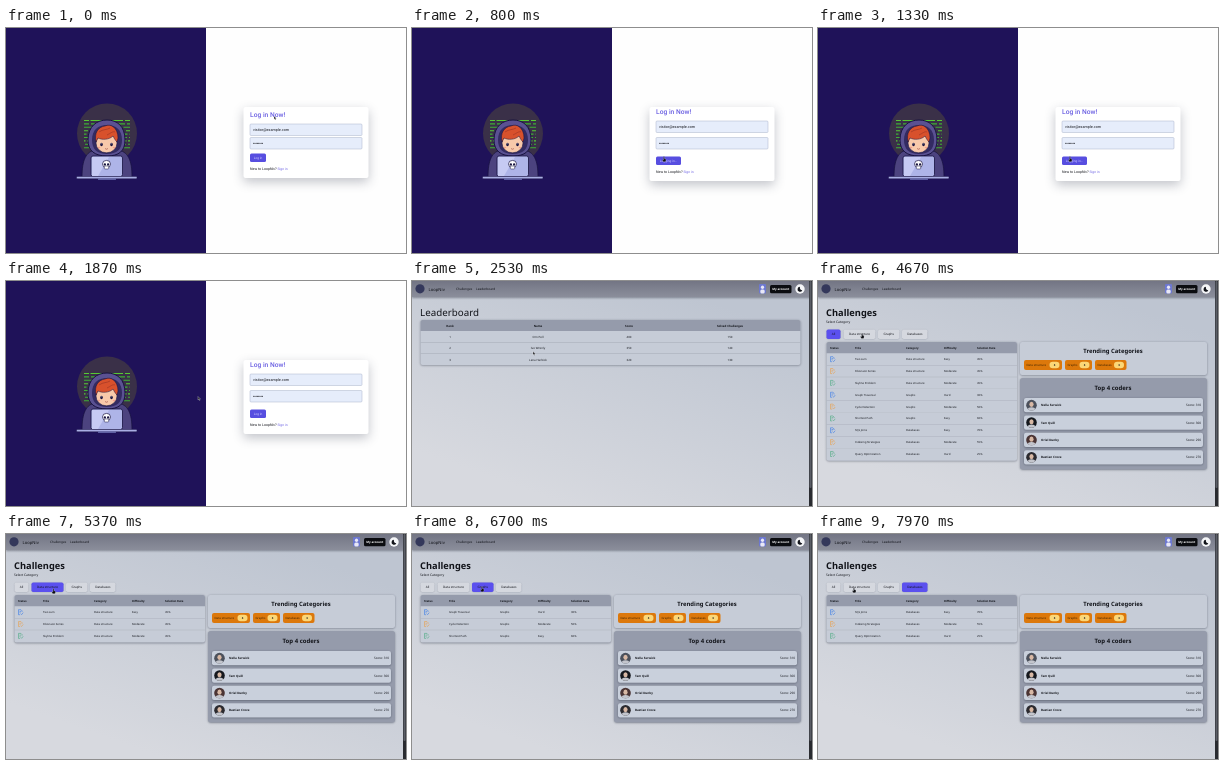
These frames come from a looping animation (400x225 px, 8000 ms). An HTML page with a canvas:

```html
<!DOCTYPE html>
<html lang="en">
<head>
<meta charset="utf-8">
<title>Coding challenges</title>
<style>
html, body { margin: 0; width: 100%; height: 100%; overflow: hidden; }
canvas { display: block; width: 100vw; height: 100vh; }
</style>
</head>
<body>
<canvas id="stage"></canvas>
<script>
const W = 400, H = 225, LOOP = 8000;
const canvas = document.getElementById('stage');
const ctx = canvas.getContext('2d');
const INK = '#12141a', PURPLE = '#5b50ee', NAVY = '#1f1259', STEEL = '#959bab', PANEL = '#c6ccd7';

// Times at which the interface changes
const AT = { submit: 620, answered: 1480, leaderboard: 2080, hover: 3350, challenges: 3600,
  avatars: 4080, unhover: 4350, structures: 5150, graphs: 6000, databases: 7080 };

// Pointer stops: time, x, y
const PATH = [[0, 268, 88], [560, 252, 130], [1450, 252, 130], [1870, 192, 115.5], [2530, 121, 70.5],
  [3300, 49, 8.5], [3950, 49, 8.5], [4750, 44, 55], [5370, 47.5, 56], [5500, 47.5, 56], [5900, 70, 54],
  [6700, 70, 54], [7030, 97, 53], [7530, 97, 53], [7950, 36, 55], [LOOP, 36, 55]];

const CATEGORIES = ['All', 'Data structure', 'Graphs', 'Databases'];
const CHALLENGES = [
  ['Two sum', 1, 'Easy', '45%'], ['Fibonacci Series', 1, 'Moderate', '45%'], ['Skyline Problem', 1, 'Moderate', '45%'],
  ['Graph Traversal', 2, 'Hard', '30%'], ['Cycle Detection', 2, 'Moderate', '50%'], ['Shortest Path', 2, 'Easy', '60%'],
  ['SQL Joins', 3, 'Easy', '70%'], ['Indexing Strategies', 3, 'Moderate', '55%'], ['Query Optimization', 3, 'Hard', '25%']];
const CODERS = [['Nella Farwick', 310, '#4b505b'], ['Tam Quill', 300, '#15181e'],
  ['Oriel Dunby', 290, '#4a3434'], ['Bastian Crove', 270, '#2b2a2f']];
const LEADERS = [['1', 'Orn Pell', '400', '150'], ['2', 'Ivo Wrenly', '350', '140'], ['3', 'Lena Harbick', '320', '130']];

// Text is centred on y; glyphs are set large and scaled down for even spacing
function text(str, x, y, size, { color = INK, weight = 400, align = 'left', font = 'Noto Sans' } = {}) {
  ctx.save();
  ctx.translate(x, y + size * 0.36);
  ctx.scale(0.1, 0.1);
  ctx.font = `${weight} ${size * 10}px "${font}", sans-serif`;
  ctx.textAlign = align;
  ctx.fillStyle = color;
  ctx.fillText(str, 0, 0);
  ctx.restore();
}

function rect(x, y, w, h, fill, radius = 0, stroke, line = 0.5) {
  ctx.beginPath();
  ctx.roundRect(x, y, w, h, radius);
  paint(fill, stroke, line);
}

function ellipse(x, y, rx, ry, fill, stroke, line = 0.7) {
  ctx.beginPath();
  ctx.ellipse(x, y, rx, ry, 0, 0, Math.PI * 2);
  paint(fill, stroke, line);
}

function shape(d, fill, stroke, line = 0.7) {
  const path = new Path2D(d);
  if (fill) { ctx.fillStyle = fill; ctx.fill(path); }
  if (stroke) { ctx.strokeStyle = stroke; ctx.lineWidth = line; ctx.stroke(path); }
}

function paint(fill, stroke, line) {
  if (fill) { ctx.fillStyle = fill; ctx.fill(); }
  if (stroke) { ctx.strokeStyle = stroke; ctx.lineWidth = line; ctx.stroke(); }
}

function gradient(x0, y0, x1, y1, from, to) {
  const fill = ctx.createLinearGradient(x0, y0, x1, y1);
  fill.addColorStop(0, from);
  fill.addColorStop(1, to);
  return fill;
}

function raised(blur, dy, color, draw) {
  const scale = canvas.width / W;
  ctx.save();
  ctx.shadowBlur = blur * scale;
  ctx.shadowOffsetY = dy * scale;
  ctx.shadowColor = color;
  draw();
  ctx.restore();
}

const panel = (x, y, w, h, fill, radius = 2) =>
  raised(2.2, 0.6, 'rgba(40,45,62,.5)', () => rect(x, y, w, h, fill, radius));

function drawHacker() {
  const line = '#17123f';
  ellipse(101, 105.5, 30, 30, '#3a3048');
  for (let i = 0; i < 9; i++) {
    const y = 92.5 + i * 3.4;
    ctx.setLineDash(i % 2 ? [9, 2, 5, 2] : [5, 1.5, 12, 2]);
    ctx.lineDashOffset = i * 4;
    shape(`M78 ${y}H124`, null, i % 3 ? '#3fae35' : '#57c934', 1.1);
  }
  ctx.setLineDash([]);
  shape('M76 149C76 132 80 123 90 122H111C122 123 126 132 126 149Z', '#4c437f', line);
  shape('M82 112C82 98 91 92 101 92S119 98 119 112C119 123 113 128 101 128S82 123 82 112Z', '#5a5192', line, 1);
  shape('M86 112C86 102 92 97 101 97S116 102 116 112C116 121 111 126 101 126S86 121 86 112Z', '#332b62');
  ellipse(100.5, 115, 10.5, 9.8, '#f8c9aa', line, 0.5);
  shape('M90 114C88 105 92 99 99 98C105 95 112 100 112 110L111 114C109 112 108 110 107 108C103 112 96 112 92 110Z', '#d8512c', line, 0.5);
  shape('M93 104C97 101 101 102 104 100M101 107C105 105 107 103 109 104', null, '#a93a26', 0.8);
  for (const x of [95.5, 105.5]) {
    ellipse(x, 116.5, 1.3, 1.8, line);
    ellipse(x - 0.4, 115.8, 0.4, 0.5, '#fff');
    ellipse(x < 100 ? 93 : 108, 119.5, 1.3, 0.8, '#f2a08c');
  }
  shape('M99 120.5Q100.5 122 102 120.5', null, '#9a4b43', 0.6);
  rect(85, 128, 31.5, 20.5, '#aeb4e8', 2, line, 0.8);
  shape('M86 129H103L92 148H86Z', '#c6caf3');
  ellipse(100.5, 136, 4, 3.6, '#fff', line);
  rect(98.3, 138, 4.4, 3, '#fff', 0.7, line, 0.5);
  ellipse(98.9, 136.4, 1.1, 1.2, line);
  ellipse(102.1, 136.4, 1.1, 1.2, line);
  rect(70.5, 148.5, 60.5, 2.2, '#a9aee4', 1, line, 0.4);
  rect(92, 150.6, 18, 1.2, '#757bbd', 0.6);
}

function drawLogin(t) {
  const roomy = t >= AT.submit, busy = roomy && t < AT.answered;
  const shift = roomy ? 3 : 0;
  const font = 'Roboto';
  rect(0, 0, W, H, '#fefefe');
  rect(0, 0, 200, H, NAVY);
  drawHacker();
  raised(11, 4, 'rgba(40,45,70,.28)', () => rect(237.5, 79, 125, 71 + shift, '#fff', 2));
  text('Log in Now!', 244, 87 - shift, 6.7, { color: '#6a5fe2', font, weight: 500 });
  rect(244, 96 - shift, 112, 11.5, '#e6edfb', 1, '#a9b3c9');
  text('visitor@example.com', 247, 102 - shift, 3.75, { font });
  rect(244, 109.5, 112, 11.5, '#e6edfb', 1, '#a9b3c9');
  for (let i = 0; i < 8; i++) ellipse(247.7 + i * 1.25, 115.2, 0.5, 0.5, INK);
  rect(244, 125.5 + shift, busy ? 25 : 16, 8.5, '#574ee0', 1.5);
  text(busy ? 'Logging in...' : 'Log in', busy ? 256.5 : 252, 129.7 + shift, 3.2, { color: '#d4d0ff', font, align: 'center' });
  text('New to LoopNiv?', 244, 140.5 + shift, 3.55, { font });
  text('Sign in', 271.5, 140.5 + shift, 3.4, { color: '#6a5fe2', font });
}

function drawFrame() {
  rect(0, 0, W, H, gradient(W * 0.6, 0, W * 0.4, H, '#bec5d1', '#d7d9df'));
  raised(2, 0.6, 'rgba(30,34,48,.4)', () => rect(0, 0, W, 16, gradient(0, 0, 0, 16, '#737584', '#8b8e9b')));
  ellipse(8, 7.8, 4.6, 4.6, '#34385b');
  text('LoopNiv', 16.5, 8, 4.2);
  text('Challenges', 44, 8, 3.15);
  text('Leaderboard', 64, 8, 3.2);
  rect(347, 3, 7, 9.5, '#6d78d0', 1);
  ellipse(350.5, 6.3, 1.6, 1.7, '#e9e8f6');
  rect(348.3, 8.4, 4.4, 4, '#e9e8f6', 1.5);
  rect(358, 4, 21.5, 8.3, '#0b0c10', 1.5);
  text('My account', 368.7, 8.1, 2.95, { color: '#fff', weight: 700, align: 'center' });
  ellipse(388, 8, 4.7, 4.7, '#f5f6f8');
  shape('M388 5.8A2.5 2.5 0 1 0 390.3 9.3A2.6 2.6 0 0 1 388 5.8Z', INK);
  rect(397, 0, 3, H, '#292b30');
  rect(397.5, 0, 2, 207, '#5b5e66', 1);
}

function drawLeaderboard() {
  drawFrame();
  text('Leaderboard', 8, 31.3, 9.8);
  panel(8.5, 39, 380, 45, PANEL);
  rect(8.5, 39, 380, 11, STEEL, [2, 2, 0, 0]);
  const columns = [38, 126, 217, 318];
  const row = (cells, y, weight) => cells.forEach((cell, i) => text(cell, columns[i], y, 2.9, { weight, align: 'center' }));
  row(['Rank', 'Name', 'Score', 'Solved Challenges'], 44.5, 600);
  LEADERS.forEach((cells, i) => {
    row(cells, 56 + i * 11.3, 400);
    rect(8.5, 61.3 + i * 11.3, 380, 0.4, '#a6abb6');
  });
}

function drawStatus(x, y, color) {
  shape(`M${x + 3.6} ${y - 0.3}v-1l-1.2 -1.2H${x}v5H${x + 1.6}`, null, color, 0.55);
  shape(`M${x + 1} ${y - 0.8}h1.6M${x + 1} ${y + 0.5}h1M${x + 2.2} ${y + 1.5}l0.9 0.9l1.6 -2`, null, color, 0.55);
}

function drawTable(selected) {
  const rows = CHALLENGES.filter(([, category]) => !selected || category === selected);
  const columns = [12, 37, 88, 126, 159];
  const put = (cells, y, weight) => cells.forEach((cell, i) => text(cell, columns[i], y, 2.75, { weight }));
  panel(8.5, 61, 190.5, 12 + rows.length * 11.85, PANEL);
  rect(8.5, 61, 190.5, 11.3, STEEL, [2, 2, 0, 0]);
  put(['Status', 'Title', 'Category', 'Difficulty', 'Solution Rate'], 66.7, 600);
  rows.forEach(([title, category, level, rate], i) => {
    const y = 78.2 + i * 11.85;
    drawStatus(12.5, y, ['#2d74ea', '#ec9a3c', '#3fa877'][i % 3]);
    put(['', title, CATEGORIES[category], level, rate], y, 400);
    if (i < rows.length - 1) rect(8.5, y + 5.8, 190.5, 0.4, '#adb2bd');
  });
}

function drawTrending() {
  panel(202, 61, 187, 33, PANEL);
  text('Trending Categories', 295, 70, 5.9, { weight: 600, align: 'center' });
  [[206, 38], [247, 27], [277, 31.5]].forEach(([x, w], i) => {
    rect(x, 79, w, 10, '#dc780b', 2);
    text(CATEGORIES[i + 1], x + 2.5, 84, 2.9, { color: '#3a2103' });
    rect(x + w - 12.5, 80.8, 10, 6.4, '#fbd777', 3.2);
    text('3', x + w - 7.5, 84, 2.8, { weight: 600, align: 'center' });
  });
}

function drawCoders(loaded) {
  panel(202, 97, 187, loaded ? 91.5 : 74, STEEL, 3);
  text('Top 4 coders', 295, 106.5, 6, { weight: 600, align: 'center' });
  let y = 117;
  CODERS.forEach(([name, score, tone], i) => {
    const avatar = loaded || i === 0, h = avatar ? 14.3 : 9.2, mid = y + h / 2;
    panel(206, y, 179, h, '#c9d0dc');
    if (avatar) {
      ctx.save();
      ellipse(213.5, mid, 5.3, 5.3, tone);
      ctx.clip();
      ellipse(213.5, mid - 0.8, 2.1, 2.6, '#d8b8a4');
      ellipse(213.5, mid + 5.2, 4, 3.2, '#c3c5cc');
      ctx.restore();
    }
    text(name, 223, mid, 3, { weight: 600 });
    text(`Score: ${score}`, 383, mid, 3.1, { align: 'right' });
    y += h + (avatar ? 3.1 : 2.8);
  });
}

function drawChallenges(t) {
  const selected = t >= AT.databases ? 3 : t >= AT.graphs ? 2 : t >= AT.structures ? 1 : 0;
  drawFrame();
  text('Challenges', 8, 31.3, 9.3, { weight: 600 });
  text('Select Category', 8, 41.3, 3.3);
  [[8.5, 14], [25.5, 32], [60, 21.5], [84, 25.5]].forEach(([x, w], i) => {
    const fill = i === selected ? PURPLE : '#d5d8df';
    raised(1.2, 0.3, 'rgba(40,45,62,.3)', () => rect(x, 48.5, w, 9.5, fill, 1.7));
    text(CATEGORIES[i], x + w / 2, 53.2, 3.1, { align: 'center' });
  });
  drawTable(selected);
  drawTrending();
  drawCoders(t >= AT.avatars);
}

function drawStatusBar() {
  rect(0, 219.5, 39.5, 5.5, '#26363a', [0, 1, 0, 0]);
  text('localhost:5173/challenges', 1, 222.3, 2.85, { color: '#a3cfc8' });
}

function drawPointer(t) {
  const next = Math.max(1, PATH.findIndex(([time]) => time > t));
  const [t0, x0, y0] = PATH[next - 1], [t1, x1, y1] = PATH[next];
  const p = (t - t0) / (t1 - t0), ease = p * p * (3 - 2 * p);
  const x = x0 + (x1 - x0) * ease, y = y0 + (y1 - y0) * ease;
  const hand = (t > AT.hover && t < AT.unhover) || t > 4600 || (t > 500 && t < 1500);
  ctx.save();
  ctx.translate(x, y);
  ctx.scale(0.8, 0.8);
  if (hand) shape('M-.7 -1.5Q0 -2.2 .6 -1.5V.8L2.4 1.3V3.3L1.7 4.7H-1L-2.2 2.5L-1.5 1.8L-.7 2.5Z', '#0c0d12', '#eef0f4', 0.3);
  else shape('M0 0V4.4L1 3.5L1.8 5L2.5 4.6L1.8 3.2H3.1Z', '#16171c', '#f4f4f6', 0.4);
  ctx.restore();
}

function render(t) {
  const scale = window.devicePixelRatio || 1;
  const width = Math.round(innerWidth * scale), height = Math.round(innerHeight * scale);
  if (canvas.width !== width || canvas.height !== height) {
    canvas.width = width;
    canvas.height = height;
  }
  ctx.setTransform(width / W, 0, 0, height / H, 0, 0);
  ctx.textRendering = 'geometricPrecision';
  if (t < AT.leaderboard) drawLogin(t);
  else if (t < AT.challenges) drawLeaderboard();
  else drawChallenges(t);
  if (t >= AT.hover && t < AT.unhover) drawStatusBar();
  drawPointer(t);
}

const start = performance.now();
function tick() {
  render((performance.now() - start) % LOOP);
  requestAnimationFrame(tick);
}
tick();
</script>
</body>
</html>
```
